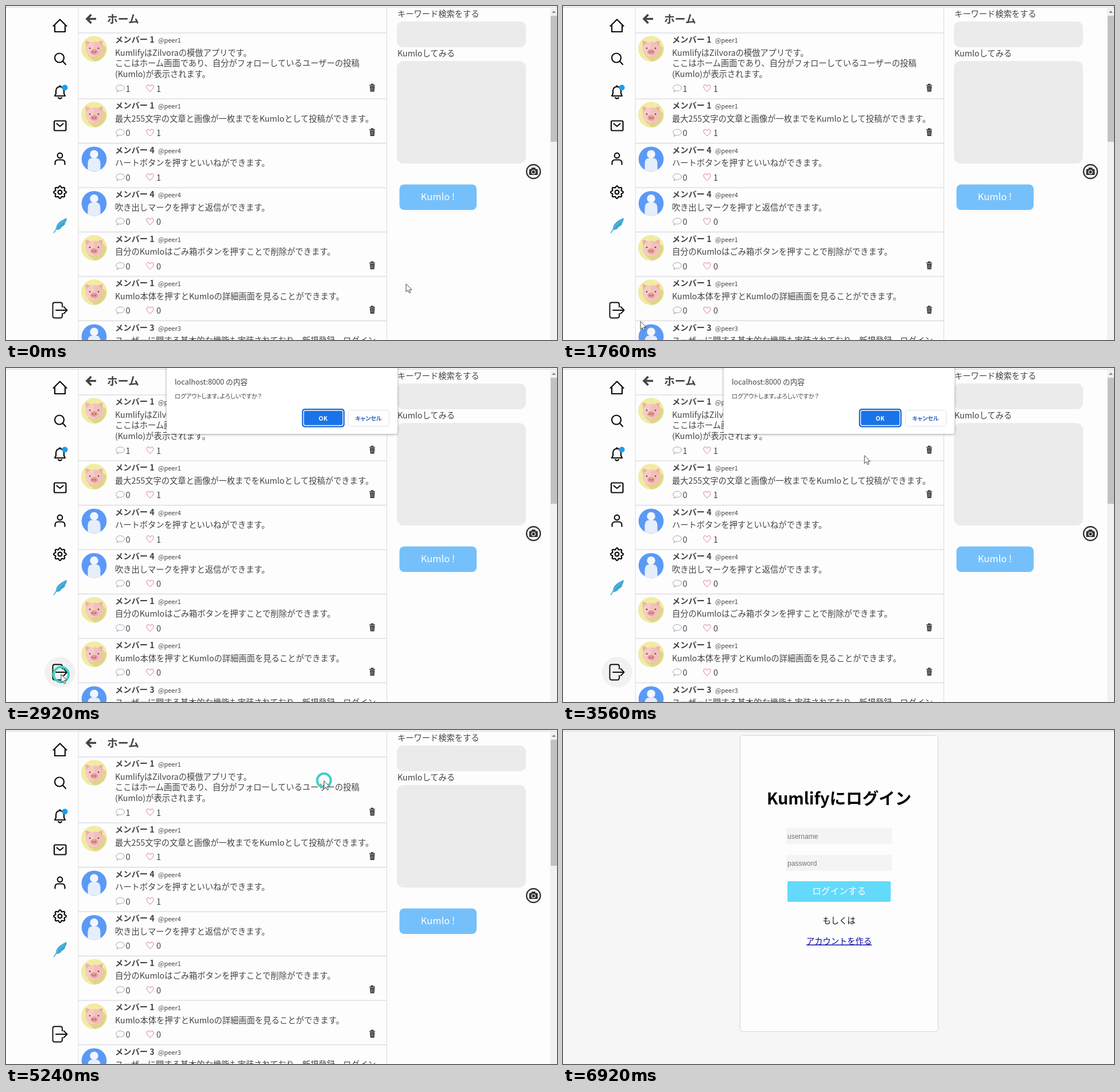
Animation, 960 px wide and 583 px high, one loop 7680 ms. Source, as an HTML page:

```html
<!DOCTYPE html>
<html lang="ja">
<head>
<meta charset="utf-8">
<title>ログアウト</title>
<style>
html, body { margin: 0; width: 100%; height: 100%; overflow: hidden; background: #fdfdfd; }
svg { display: block; width: 960px; height: 583px; }
text { font-family: "Noto Sans CJK JP", "Noto Sans CJK", sans-serif; white-space: pre; }
.field { font-family: "Liberation Sans", Arial, sans-serif; }
.tight { font-feature-settings: "palt"; }
.icon { fill: none; stroke: #0c0c0c; stroke-width: 2.2; stroke-linejoin: round; stroke-linecap: round; }
</style>
</head>
<body>
<svg id="stage" viewBox="0 0 960 583"></svg>
<script>
const LOOP = 7680;
const APP = 'Kumlify', POST = 'Kumlo';

const text = (x, y, s, size = 14.25, attrs = '') =>
  `<text x="${x}" y="${y}" font-size="${size}" fill="#444" ${attrs}>${s}</text>`;
const rect = (x, y, w, h, r, fill, attrs = '') =>
  `<rect x="${x}" y="${y}" width="${w}" height="${h}" rx="${r}" fill="${fill}" ${attrs}/>`;
const circle = (x, y, r, fill, attrs = '') =>
  `<circle cx="${x}" cy="${y}" r="${r}" fill="${fill}" ${attrs}/>`;
const path = (d, attrs = '') => `<path d="${d}" ${attrs}/>`;
const centred = (fill, more = '') => `text-anchor="middle" style="fill:${fill}" ${more}`;

// Avatars and row icons, drawn around their own centre
const pig = circle(0, 0, 22.5, '#f1eba3') +
  path('M10 -12L21 -2A22.5 22.5 0 0 1 1 22L-11 12Z', 'fill="#ded58b"') +
  path('M-14 -2L-15 -14Q-8 -14 -5 -9ZM14 -2L15 -14Q8 -14 5 -9Z', 'fill="#eeb0aa"') +
  '<ellipse cy="1" rx="15" ry="13.5" fill="#f6cbc5"/>' +
  path('M0 -12.5A15 13.5 0 0 1 0 14.5Z', 'fill="#f2c0ba"') +
  circle(-7.5, -1, 1.3, '#5a4444') + circle(7.5, -1, 1.3, '#5a4444') +
  '<ellipse cy="5.5" rx="6.3" ry="4.8" fill="#e59a95"/>' +
  circle(-2.3, 5.5, 1.2, '#a85f5f') + circle(2.3, 5.5, 1.2, '#a85f5f');
const person = circle(0, 0, 21.8, '#5b99f6') +
  path('M-11 19V8Q-11 -2 -3 -2H3Q11 -2 11 8V19Q0 24 -11 19Z', 'fill="#e6eefb"') +
  circle(0, -8.5, 7.2, '#f3f6fc');
const bubble = '<ellipse cx="199" cy="-19" rx="7.3" ry="5.2" fill="none" stroke="#80809a" stroke-width=".9" stroke-dasharray="2.6 .7"/>' +
  circle(194, -13, 1, 'none', 'stroke="#80809a" stroke-width=".7"');
const heart = path('M251 -12.5C246 -17 245 -19 245 -21.2C245 -25 249.8 -25.3 251 -21.8C252.2 -25.3 257 -25 257 -21.2C257 -19 256 -17 251 -12.5Z',
  'fill="none" stroke="#d4607e" stroke-width=".9"');
const trash = path('M633 -23.5H643M636.5 -24V-25.5H639.5V-24', 'fill="none" stroke="#333" stroke-width="1.6"') +
  path('M634 -22H642.4L641.6 -12.5H634.8Z', 'fill="#333"') +
  path('M636.4 -20.5V-14M638.2 -20.5V-14M640 -20.5V-14', 'stroke="#bbb" stroke-width=".7"');

const rows = [
  [47, 162, 1, 1, 1, `${APP}はZilvoraの模倣アプリです。`,
    'ここはホーム画面であり、自分がフォローしているユーザーの投稿', `(${POST})が表示されます。`],
  [162, 239.5, 1, 0, 1, `最大255文字の文章と画像が一枚までを${POST}として投稿ができます。`],
  [239.5, 317, 4, 0, 1, 'ハートボタンを押すといいねができます。'],
  [317, 394.5, 4, 0, 0, '吹き出しマークを押すと返信ができます。'],
  [394.5, 472, 1, 0, 0, `自分の${POST}はごみ箱ボタンを押すことで削除ができます。`],
  [472, 549.5, 1, 0, 0, `${POST}本体を押すと${POST}の詳細画面を見ることができます。`],
  [549.5, 640, 3, 0, 0, 'ユーザーに関する基本的な機能も実装されており、新規登録、ログイン']
];
const row = ([top, end, who, replies, likes, ...lines], i) =>
  rect(126, top, 537, end - top, 0, '#f4f4f4', `id="row${i}" opacity="0"`) +
  path(`M126 ${top}H663`, 'stroke="#cfcfda"') +
  `<g transform="translate(153.5 ${top + 27.7})">${who === 1 ? pig : person}</g>` +
  text(190, top + 17, `メンバー ${who}`, 14.25, 'font-weight="bold"') +
  text(265, top + 17, `@peer${who}`, 11) +
  lines.map((s, k) => text(190, top + 39.5 + 18.5 * k, s)).join('') +
  `<g transform="translate(0 ${end})">${bubble}${heart}${who === 1 ? trash : ''}
  ${text(208.5, -12.5, replies, 14.5)}${text(262, -12.5, likes, 14.5)}</g>`;

const gear = 'M' + Array.from({ length: 96 }, (_, i) => {
  const a = i * Math.PI / 48, r = 9.6 + 1.4 * Math.cos(8 * a);
  return `${(94 + r * Math.sin(a)).toFixed(1)} ${(325 - r * Math.cos(a)).toFixed(1)}`;
}).join('L') + 'Z';
const sidebar = circle(94, 531, 26.5, '#f1f1f1', 'id="exitHover" opacity="0"') +
  '<g class="icon">' + [
    'M82.5 35L94 23.5L105.5 35M85 33.5V45H103V33.5',
    'M99 96.5L104 102',
    'M85 157H103L101 153V148C101 138.5 87 138.5 87 148V153ZM91 160Q94 163 97 160M94 141V139',
    'M88.5 205.5L94 210L99.5 205.5',
    'M85.5 276.5V274Q85.5 268.5 91 268.5H97Q102.5 268.5 102.5 274V276.5',
    gear
  ].map(d => path(d)).join('') +
  path('M98 525V521Q98 517.5 94.5 517.5H85Q81.5 517.5 81.5 521V541Q81.5 544.5 85 544.5H94.5Q98 544.5 98 541V537M87 531H106M100.5 525L106.5 531L100.5 537', 'stroke-width="1.9"') +
  circle(93, 90.5, 8, 'none') + rect(84, 200.5, 20.5, 17, 2, 'none') +
  circle(94, 261, 4.3, 'none') + circle(94, 325, 3.4, 'none') + '</g>' +
  circle(102.5, 142.5, 5, '#1b9df0') +
  path('M82.5 396.5L87 388Q88 377 106 370Q105.5 376 102 380L104 379.5Q100 385 95 386.5L97 387Q92 391 87.5 391L84 396.5Z', 'fill="#3aa5d4"') +
  path('M85.500 392Q91 382 102 374', 'fill="none" stroke="#a9dcf0" stroke-width=".7"');

const panel = text(682, 18.5, 'キーワード検索をする') + rect(681, 27, 225, 45, 11, '#ebebeb') +
  text(682, 88, `${POST}してみる`) + rect(681, 96, 225, 179, 12, '#ebebeb') +
  circle(919, 289, 12, '#fdfdfd', 'stroke="#333" stroke-width="2.4"') +
  rect(911.5, 284.5, 15, 10.5, 1.5, '#333') + rect(915.5, 282, 7, 4, 1, '#333') +
  circle(919, 289.7, 3.2, '#333', 'stroke="#fff" stroke-width="1.2"') +
  rect(685.5, 311.5, 134.5, 44.5, 8, '#75c0fb') +
  text(752.5, 339, `${POST} !`, 16.5, centred('#fff')) +
  rect(948, 3, 12, 580, 0, '#f1f1f1') + rect(949, 17, 11, 220, 0, '#c1c1c1') +
  path('M951 12L954.5 8L958 12Z', 'fill="#8a8a8a"');

const topLine = path('M0 2H960', 'stroke="#dedeca" stroke-width="1.4"');

const home = rect(0, 0, 960, 583, 0, '#fdfdfd') + rows.map(row).join('') + topLine +
  path('M126 3V583M663.5 3V583', 'stroke="#dcdce2"') +
  path('M157 22.5H142M148.5 15L141 22.5L148.5 30', 'fill="none" stroke="#444" stroke-width="3.6"') +
  text(176, 30, 'ホーム', 18.8, 'font-weight="bold"') + sidebar + panel;

const dialog = rect(280, -30, 402, 145, 4, '#fff', 'filter="url(#shadow)"') +
  text(294, 28.5, 'localhost:8000 の内容', 12.7) +
  text(294, 53, 'ログアウトします。よろしいですか？', 10.4, 'class="tight"') +
  rect(517, 73, 72, 29, 3, '#1a73e8', 'id="ok"') +
  `<g id="focus">${rect(516.5, 72, 72.5, 30.5, 4, 'none', 'stroke="#1a66cf" stroke-width="1.8"')}
  ${rect(518.5, 74, 68.5, 26.5, 3, 'none', 'stroke="#fff" stroke-width="1.3"')}</g>` +
  text(552.5, 92, 'OK', 10.5, centred('#fff', 'font-weight="bold"')) +
  rect(596.5, 73.5, 71, 28, 3, '#fff', 'stroke="#e0e2e6"') +
  text(631.5, 91.5, 'キャンセル', 10, centred('#2a68c4', 'class="tight" font-weight="bold"'));

const field = (y, s) => rect(389, y, 184, 28, 0, '#f4f4f4') +
  text(391, y + 18.5, s, 12, 'class="field" style="fill:#757575"');
const login = rect(0, 0, 960, 583, 0, '#f6f6f6') + topLine +
  rect(308.5, 9.5, 345, 517, 5, '#fdfdfd', 'stroke="#d4d4c8"') +
  text(481, 130, `${APP}にログイン`, 28.5, centred('#000', 'font-weight="bold"')) +
  field(171, 'username') + field(218, 'password') +
  rect(391, 264, 180, 36, 2, '#63dafb') +
  text(481, 287, 'ログインする', 15.6, centred('#fff')) +
  text(481, 337.5, 'もしくは', 14.25, centred('#111')) +
  text(481, 373.5, 'アカウントを作る', 14.25, centred('#0808a8', 'text-decoration="underline"'));

const arrow = path('M0 0V14L3.3 11L5.6 16L7.8 15L5.6 10.2H10Z',
  'id="arrow" fill="#fff" stroke="#444" stroke-width="1"');
const hand = path('M-1.5 1Q0 -1.5 1.5 1V7Q3.5 5.5 4.5 7.5Q6.5 6.5 7.3 8.5Q9 8 9 10V13Q9 16 7.5 19H-.5Q-2 15.5 -5 12Q-5.5 9.5 -3.5 10L-1.5 12Z',
  'id="hand" fill="#fff" stroke="#333" stroke-width="1" stroke-linejoin="round"');

const stage = document.getElementById('stage');
stage.innerHTML = `<defs><filter id="shadow" x="-10%" y="-20%" width="120%" height="140%">
  <feDropShadow dx="0" dy="1" stdDeviation="2" flood-opacity=".38"/></filter></defs>
  <g id="home">${home}</g><g id="dialog">${dialog}</g><g id="login">${login}</g>
  <g id="ripple">${circle(0, 0, 1, 'none', 'id="ring" stroke="#3dd0c8"')}${circle(0, 0, 2.5, '#8fdcec', 'id="dot"')}</g>
  <g id="cursor">${arrow}${hand}</g>`;

const $ = id => document.getElementById(id);
const set = (id, name, value) => $(id).setAttribute(name, value);
const show = (id, on) => set(id, 'visibility', on ? 'visible' : 'hidden');
const ramp = (t, a, b) => Math.min(1, Math.max(0, (t - a) / (b - a)));

// Pointer stops: time, x, y
const stops = [
  [0, 697, 485], [660, 697, 485], [1000, 595, 498], [1440, 300, 538], [1800, 115, 552],
  [2200, 96, 535], [3080, 96, 535], [3560, 525, 153], [3820, 579, 72], [3960, 574, 76],
  [4200, 554, 88], [5440, 554, 89], [5940, 627, 561], [LOOP, 627, 561]
];
function pointer(t) {
  const i = stops.findIndex(s => s[0] > t);
  const [a, x, y] = stops[i - 1], [b, u, v] = stops[i];
  const k = ramp(t, a, b);
  return [x + (u - x) * k, y + (v - y) * k];
}
const clicks = [[2380, 96, 535], [4740, 554, 88]];
const RIPPLE = 720;

function draw() {
  const t = performance.now() % LOOP;
  const [x, y] = pointer(t);
  set('cursor', 'transform', `translate(${x} ${y})`);
  const isHand = t > 820 && t < 1680 || t > 1880 && t < 2540 || t > 3800 && t < 4880;
  show('arrow', t < 5960 && !isHand);
  show('hand', isHand);

  set('row5', 'opacity', ramp(t, 780, 880) - ramp(t, 1680, 1780));
  set('row0', 'opacity', .45 * (ramp(t, 4780, 4840) - ramp(t, 4900, 5000)));
  set('exitHover', 'opacity', ramp(t, 1880, 1980) - ramp(t, 4760, 4860));

  const enter = ramp(t, 2520, 2720), leave = ramp(t, 4780, 4900);
  set('dialog', 'opacity', enter * (1 - leave ** 6));
  set('dialog', 'transform', `translate(0 ${-18 * (1 - enter) - 16 * leave})`);
  set('ok', 'fill', t > 3820 ? '#1b6fdf' : '#1a73e8');
  show('focus', t < 4660);
  show('login', t >= 5320);

  const click = clicks.find(c => t >= c[0] && t < c[0] + RIPPLE);
  show('ripple', click);
  if (click) {
    const k = (t - click[0]) / RIPPLE, outer = 20 * k, width = Math.min(4, outer);
    set('ripple', 'transform', `translate(${click[1]} ${click[2]})`);
    set('ring', 'r', outer - width / 2);
    set('ring', 'stroke-width', width);
    set('ring', 'opacity', 1 - ramp(k, .75, 1.1));
    set('dot', 'opacity', .7 * (1 - k));
  }
  requestAnimationFrame(draw);
}
draw();
</script>
</body>
</html>
```
